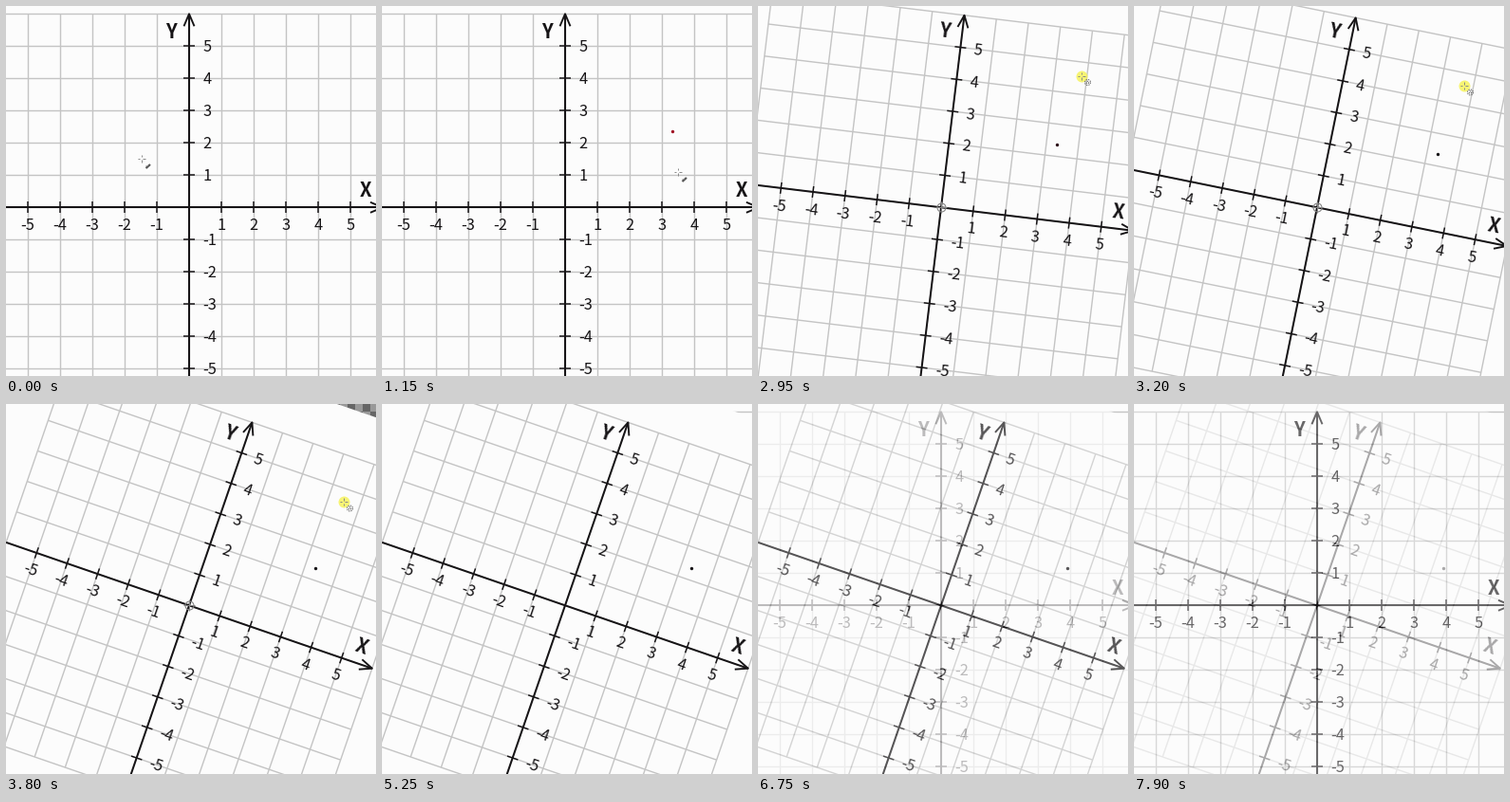
Write a matplotlib script that moves like this. It is 390 px wide and 390 px high and loops after 8000 ms.

```python
import numpy as np
import matplotlib.pyplot as plt
from matplotlib.animation import FuncAnimation
from matplotlib.collections import LineCollection

SIZE, DPI = 390, 100
PX = 72 / DPI
UNIT = 34
ORIGIN = np.array([193.0, 212.3])
TOP_EDGE = -251.5          # top of the rotated sheet, relative to the origin
BG, INK, GRID = "#fcfcfc", "#161416", "#c4c4c4"
FONT = "Noto Sans CJK JP"
STEP, LOOP = 50, 8000

fig = plt.figure(figsize=(SIZE / DPI, SIZE / DPI), dpi=DPI, facecolor=BG)
ax = fig.add_axes([0, 0, 1, 1])


def reset_axes():
    ax.clear()
    ax.set_axis_off()
    ax.set_xlim(0, SIZE)
    ax.set_ylim(SIZE, 0)


def turn(points, angle):
    """Rotate offsets clockwise about the origin and place them on the stage."""
    a = np.radians(angle)
    x, y = np.asarray(points, float).T
    return np.column_stack([x * np.cos(a) - y * np.sin(a),
                            x * np.sin(a) + y * np.cos(a)]) + ORIGIN


def lines(paths, color, width, angle=0, **kw):
    ax.add_collection(LineCollection([turn(p, angle) for p in paths],
                                     colors=color, linewidths=width * PX, **kw))


def label(x, y, text, size, angle, **kw):
    px, py = turn([(x, y)], angle)[0]
    ax.text(px, py, text, fontsize=size * PX, family=FONT, color=INK,
            rotation=-angle, rotation_mode="anchor", va="baseline", **kw)


def plane(angle):
    end = 6 * UNIT
    marks = [k * UNIT for k in range(-6, 7)]
    lines([[(m, -end), (m, end)] for m in marks]
          + [[(-end, m), (end, m)] for m in marks], GRID, 1.4, angle, zorder=1)

    lines([[(-end, 0), (end, 0)], [(0, end), (0, -end)]], INK, 2, angle, zorder=2)
    lines([[(end - 13, -5.5), (end, 0), (end - 13, 5.5)],
           [(-5.5, 13 - end), (0, -end), (5.5, 13 - end)]],
          INK, 1.9, angle, zorder=2)
    inner = [m for m in marks if 0 < abs(m) < end]
    lines([[(m, -6), (m, 6)] for m in inner]
          + [[(-6, m), (6, m)] for m in inner], INK, 1.5, angle, zorder=2)

    for k in range(-5, 6):
        if k:
            label(k * UNIT, 23.7, str(k), 16.4, angle, ha="center")
            label(14.3, 6 - k * UNIT, str(k), 16.4, angle, ha="left")
    label(186, -11, "X", 20, angle, ha="center", weight="bold")
    label(-19, -178.5, "Y", 20, angle, ha="center", weight="bold")


def dot(angle, color):
    x, y = turn([(113.3, -80.3)], angle)[0]
    ax.plot(x, y, "o", ms=3.4 * PX, mew=0, color=color, zorder=4)


def stroke(xs, ys, color, width, **kw):
    ax.plot(xs, ys, color=color, lw=width * PX, zorder=7,
            solid_capstyle="butt", **kw)


def cursor(x, y, tool):
    for dx, dy in ((1, 0), (-1, 0), (0, 1), (0, -1)):
        stroke([x + 1.5 * dx, x + 4 * dx], [y + 1.5 * dy, y + 4 * dy],
               "#8a8a8a", 1)
    if tool == "pencil":
        stroke([x + 5, x + 9.5], [y + 10.5, y + 6.5], "#555555", 2.2)
        stroke([x + 4, x + 6], [y + 7.5, y + 7.5], "#aaaaaa", 1)
    else:
        for r in (1.2, 3):
            t = np.linspace(0, 2 * np.pi, 25)
            stroke(x + 7 + r * np.cos(t), y + 7 + r * np.sin(t), "#666666", 1,
                   dashes=(1.4, 1))


def glow(x, y):
    ax.plot(x, y, "o", ms=12 * PX, mew=0, color="#f6f352", alpha=0.8, zorder=6)


def pivot():
    x, y = ORIGIN - (0.5, 0.3)
    ax.plot(x, y, "o", ms=9 * PX, mfc="none", mec="#858585", mew=1.1 * PX, zorder=5)
    ax.plot(x, y, "+", ms=12 * PX, color="#858585", mew=PX, zorder=5)


def grab():
    fig.canvas.draw()
    return np.asarray(fig.canvas.buffer_rgba())[..., :3].astype(float)


def scene(angle=0, ink=None, pointer=None, tool="pencil", pressed=False,
          pivoted=False):
    reset_axes()
    plane(angle)
    if ink:
        dot(angle, ink)
    if pivoted:
        pivot()
    if pressed:
        glow(*pointer)
    if pointer:
        cursor(*pointer, tool)
    return grab()


ROWS, COLS = np.mgrid[0:SIZE, 0:SIZE]
CHECKER = np.where((ROWS // 8 + COLS // 8) % 2, 102.0, 153.0)[..., None]


def lay(sheet, angle, under, opacity=1.0):
    """Place a rotated sheet over a backdrop."""
    a = np.radians(angle)
    dx, dy = COLS + 0.5 - ORIGIN[0], ROWS + 0.5 - ORIGIN[1]
    depth = dy * np.cos(a) - dx * np.sin(a) - TOP_EDGE
    cover = np.clip(depth + 0.5, 0, 1)[..., None] * opacity
    return sheet * cover + under * (1 - cover)


shots = []


def add(time, image):
    shots.append((time, np.clip(image + 0.5, 0, 255).astype(np.uint8)))


# Placing the point
RED, DARK_RED, BLACK = "#a01424", "#7a1420", "#161316"
add(0, scene(pointer=(142.5, 160.5)))
add(300, scene(pointer=(344.5, 147.5)))
add(600, scene(pointer=(312.5, 139.5)))
add(900, scene(ink=RED, pointer=(307, 133)))
add(1150, scene(ink=RED, pointer=(311.5, 174.5)))
add(1450, scene(ink=RED))
add(2350, scene(ink=DARK_RED, pointer=(313.5, 52.5), tool="rotate"))

# Dragging the sheet round its origin
FINAL = 19
for time, angle, spot, ink in ((2650, 2.5, (327, 62), "#4a1018"),
                               (2950, 6.9, (340.5, 73.5), "#2c1018"),
                               (3200, 11.5, (347.5, 84), BLACK),
                               (3500, 16, (352.5, 94.5), BLACK),
                               (3800, FINAL, (355.5, 103), BLACK)):
    sheet = scene(angle, ink, spot, "rotate", pressed=True, pivoted=True)
    add(time, lay(sheet, angle, CHECKER))
for time, spot in ((4100, (355.5, 103)), (4700, (355.5, 103.5)),
                   (5000, (354.5, 103.5))):
    sheet = scene(FINAL, BLACK, spot, "rotate", pivoted=True)
    add(time, lay(sheet, FINAL, CHECKER))

# Fading the rotated sheet to reveal the first one
base, tilted = scene(), scene(FINAL, BLACK)
for k, time in enumerate((5250, 5550, 5850, 6150, 6450, 6750,
                          7000, 7300, 7600, 7900)):
    add(time, lay(tilted, FINAL, base, 1 - 0.28 * (k / 5) ** 1.4))

times = [t for t, _ in shots]
reset_axes()
view = ax.imshow(shots[0][1], extent=(0, SIZE, SIZE, 0), aspect="auto",
                 interpolation="nearest")


def update(i):
    view.set_data(shots[np.searchsorted(times, i * STEP, side="right") - 1][1])
    return [view]


anim = FuncAnimation(fig, update, frames=LOOP // STEP, interval=STEP,
                     repeat=True, repeat_delay=0, blit=False)
plt.show()
```
